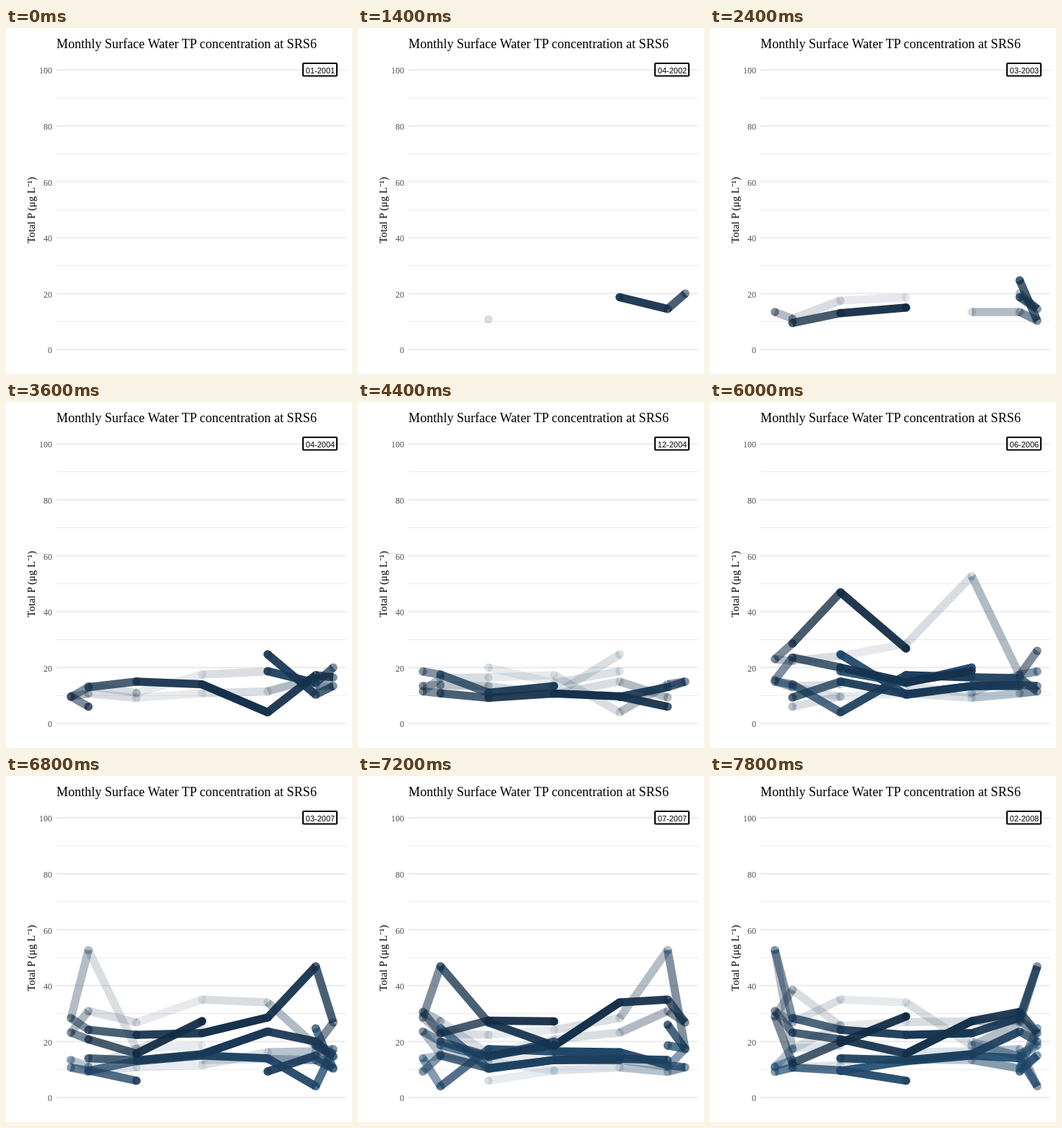
Recreate the animation shown at these times as an HTML page. Size 480 px wide and 480 px high, loop 8000 ms.

```html
<!DOCTYPE html>
<html lang="en">
<head>
<meta charset="utf-8">
<title>Monthly TP</title>
<style>
  html, body { margin: 0; width: 100%; height: 100%; overflow: hidden; background: #fff; }
  svg { display: block; width: 100vw; height: 100vh; }
  text { font-family: "Liberation Serif", "Times New Roman", serif; }
  .title { font-size: 18.15px; }
  .axis { font-size: 14.67px; text-anchor: middle; }
  .tick { font-size: 12px; fill: #4d4d4d; text-anchor: end; }
  .date { font: 11px "Liberation Sans", Arial, sans-serif; text-anchor: middle; }
</style>
</head>
<body>
<svg viewBox="0 0 480 480">
  <g id="grid"></g>
  <text class="title" x="70" y="28">Monthly Surface Water TP concentration at SRS6</text>
  <text class="axis" transform="translate(40 252.5) rotate(-90)">Total P (μg L⁻¹)</text>
  <g id="paths" stroke-width="11.3"></g>
  <g id="points"></g>
  <rect x="412" y="49" width="47" height="17.5" rx="1" fill="#fff" stroke="#000" stroke-width="2"/>
  <text class="date" id="date" x="436" y="63"></text>
</svg>
<script>
  const LOOP = 8000, STEP = 200, MONTHS_PER_STEP = 2.18;

  // Unbroken series of readings, keyed by months since January 2001.
  const runs = Object.entries({
    4: [18.7, 14.5, 20],
    10: [10.8],
    16: [24.7, 10.3, 13.4, 13.4],
    20: [18.6, 17.5, 11, 13.4],
    24: [9.5, 13, 15, 14, 4, 17.3, 16.5, 16.2, 11.5, 10.8, 9.2, 10.7, 9.7, 6],
    39: [9.3, 15, 10.5, 13.4, 13.8, 13.4],
    48: [14, 13.3, 15.5, 23.6, 20, 14.8, 18.8],
    56: [26, 17.3, 52.7, 28.4, 24.2, 22.4, 23, 28.6, 46.9, 26.8, 18.5, 34, 35, 26.8,
         30.9, 23.2, 20.8, 15.7, 27.3, 30.6, 23, 27.5, 27.2, 27, 25.6, 38.5, 29, 12.3, 19.6, 29]
  });

  const byId = id => document.getElementById(id);
  const yOf = value => 446 - 3.88 * value;
  const mix = (a, b, t) => Math.round(a + (b - a) * t);

  function drawGrid() {
    let lines = '';
    for (let v = 0; v <= 100; v += 10) {
      const major = v % 20 === 0, y = yOf(v);
      lines += `<path d="M70 ${y}H472" stroke="#ebebeb" stroke-width="${major ? 2.1 : 1.1}"/>`;
      if (major) lines += `<text class="tick" x="64" y="${y + 5.3}">${v}</text>`;
    }
    byId('grid').innerHTML = lines;
  }

  // Readings circle a vertical axis once a year, the newest in front.
  function place(value, age) {
    const angle = age * Math.PI / 6, t = age / 230;
    return {
      x: (272 - 182 * Math.sin(angle)).toFixed(2),
      y: yOf(value).toFixed(2),
      alpha: (0.55 + 0.45 * Math.cos(angle)).toFixed(3),
      color: `rgb(${mix(19, 86, t)},${mix(43, 177, t)},${mix(67, 247, t)})`
    };
  }

  function draw(month) {
    let paths = '', points = '';
    for (const [start, values] of runs) {
      const age = month - start;
      if (age < 1) continue;
      const shown = values.slice(0, age + 1).map((v, i) => place(v, age - i));
      shown.forEach((p, i) => {
        const next = shown[i + 1];
        if (next) paths += `<path d="M${p.x} ${p.y}L${next.x} ${next.y}" stroke="${p.color}" stroke-opacity="${p.alpha}"/>`;
        points += `<circle cx="${p.x}" cy="${p.y}" r="5.8" fill="${p.color}" fill-opacity="${p.alpha}"/>`;
      });
    }
    byId('paths').innerHTML = paths;
    byId('points').innerHTML = points;
    byId('date').textContent =
      String(month % 12 + 1).padStart(2, '0') + '-' + (2001 + Math.floor(month / 12));
  }

  let current = -1;
  function tick() {
    const step = Math.floor(performance.now() % LOOP / STEP);
    const month = Math.floor(step * MONTHS_PER_STEP);
    if (month !== current) draw(current = month);
    requestAnimationFrame(tick);
  }

  drawGrid();
  tick();
</script>
</body>
</html>
```
